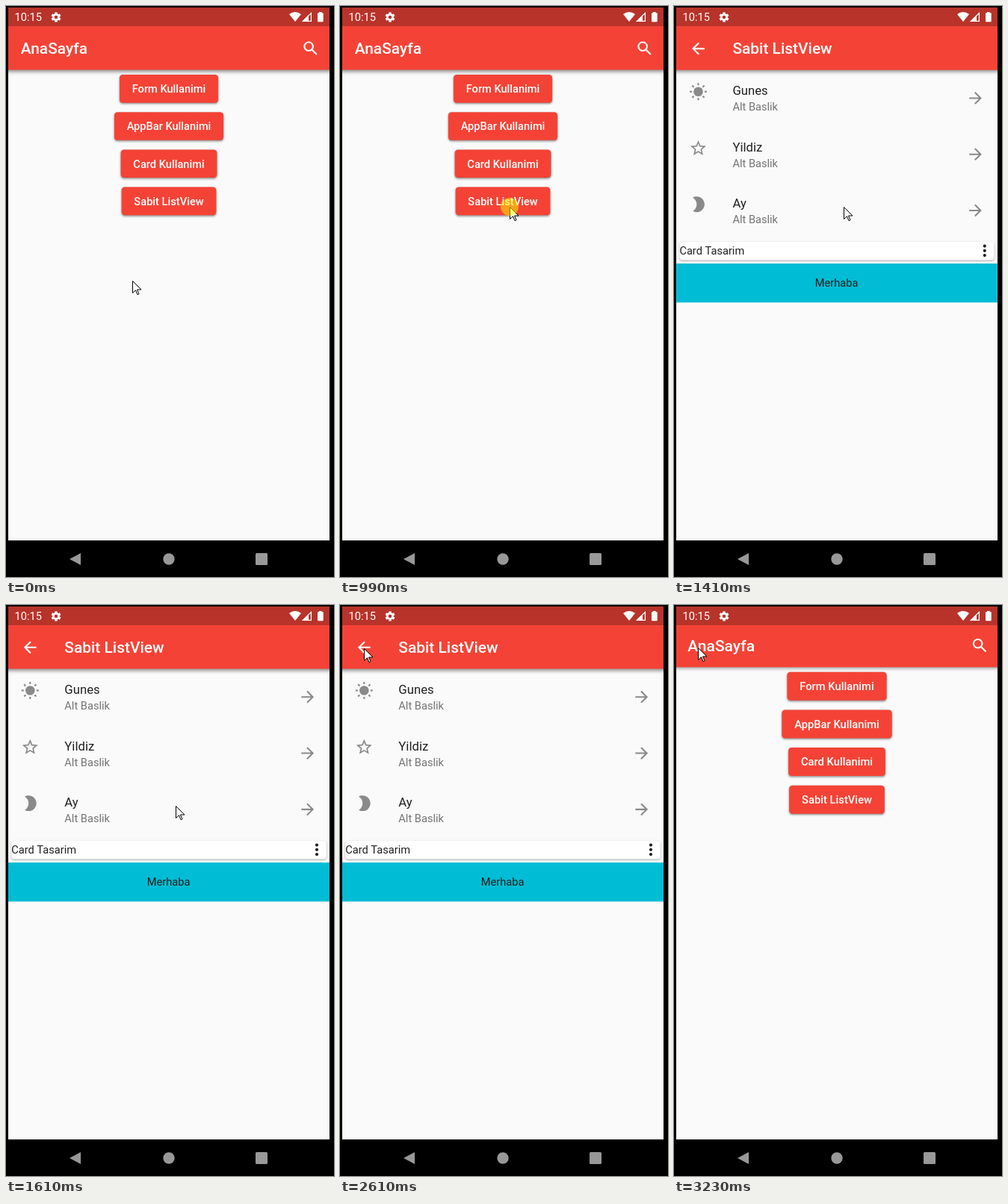
An HTML page with a canvas for the animation above (3.43 s loop, 439 by 765 pixels).

```html
<!DOCTYPE html>
<html lang="tr">
<head>
<meta charset="utf-8">
<title>Sabit ListView</title>
<style>
html, body { margin: 0; width: 100%; height: 100%; overflow: hidden; background: #000; }
canvas { display: block; width: 439px; height: 765px; }
</style>
</head>
<body>
<canvas id="stage"></canvas>
<script>
const W = 439, H = 765, LOOP = 3430;
const DP = 430 / 411;
const SCREEN = { x: 3, y: 2, w: 430, h: 714 };
const MID = { x: 218, y: 359 };
const RED = '#f44336', PAPER = '#fafafa', GREY = '#8a8a8a', INK = '#212121';

const canvas = document.getElementById('stage');
const ctx = canvas.getContext('2d');
const dpr = window.devicePixelRatio || 1;
canvas.width = W * dpr;
canvas.height = H * dpr;

// Each step: start time, cursor tip, page, and optional state
const steps = [
  { at: 0, x: 169, y: 368, page: home },
  { at: 200, x: 198, y: 337, page: home },
  { at: 390, x: 225, y: 281, page: home },
  { at: 590, x: 227, y: 269, page: home },
  { at: 990, x: 227, y: 269, page: home, click: true },
  { at: 1190, x: 227, y: 269, page: home, pressed: true },
  { at: 1410, x: 227, y: 269, page: list, zoom: 0.999 },
  { at: 1610, x: 227, y: 269, page: list },
  { at: 1810, x: 218, y: 252, page: list },
  { at: 2010, x: 116, y: 144, page: list },
  { at: 2210, x: 33, y: 63, page: list },
  { at: 2610, x: 32, y: 58, page: list },
  { at: 2810, x: 32, y: 57, page: list },
  { at: 3010, x: 32, y: 57, page: list, click: true },
  { at: 3230, x: 32, y: 57, page: home, zoom: 1.008 }
];

const BACK = new Path2D('M20 11H7.83l5.59-5.59L12 4l-8 8 8 8 1.41-1.41L7.83 13H20v-2z');
const FORWARD = new Path2D('M12 4l-1.41 1.41L16.17 11H4v2h12.17l-5.58 5.59L12 20l8-8z');
const MOON = new Path2D('M10 2c-1.82 0-3.53.5-5 1.35C7.99 5.08 10 8.3 10 12s-2.01 6.92-5 8.65C6.47 21.5 8.18 22 10 22c5.52 0 10-4.48 10-10S15.52 2 10 2z');
const STAR = new Path2D('M22 9.24l-7.19-.62L12 2 9.19 8.63 2 9.24l5.46 4.73L5.82 21 12 17.27 18.18 21l-1.63-7.03L22 9.24zM12 15.4l-3.76 2.27 1-4.28-3.32-2.88 4.38-.38L12 6.1l1.71 4.04 4.38.38-3.32 2.88 1 4.28L12 15.4z');
const ARROW = new Path2D('M.5.5v16l4-3.8 2.5 6 2-.9-2.5-5.8h5.5z');

function rect(x, y, w, h, color) {
  ctx.fillStyle = color;
  ctx.fillRect(x, y, w, h);
}

function disc(x, y, r, color) {
  ctx.fillStyle = color;
  ctx.beginPath();
  ctx.arc(x, y, r, 0, 2 * Math.PI);
  ctx.fill();
}

function poly(color, ...pts) {
  ctx.fillStyle = color;
  ctx.beginPath();
  pts.forEach(([x, y]) => ctx.lineTo(x, y));
  ctx.fill();
}

function rounded(x, y, w, h, r) {
  ctx.beginPath();
  ctx.roundRect(x, y, w, h, r);
}

function text(str, x, y, size, color, weight = 400, align = 'left') {
  ctx.font = `${weight} ${size * DP}px Roboto, sans-serif`;
  ctx.textAlign = align;
  ctx.fillStyle = color;
  ctx.fillText(str, x, y);
}

function shadow(dy, blur, alpha) {
  ctx.shadowColor = `rgba(0,0,0,${alpha})`;
  ctx.shadowOffsetY = dy * dpr;
  ctx.shadowBlur = blur * dpr;
}

// Runs a drawing in a 24-unit icon box centred on x, y
function icon(x, y, color, draw) {
  ctx.save();
  ctx.translate(x, y);
  ctx.scale(DP, DP);
  ctx.translate(-12, -12);
  ctx.fillStyle = ctx.strokeStyle = color;
  draw();
  ctx.restore();
}

const glyph = path => () => ctx.fill(path, 'evenodd');

function sun() {
  disc(12, 11.5, 6, GREY);
  ctx.translate(12, 11.5);
  for (let i = 0; i < 8; i++) {
    ctx.fillRect(8.1, -1, 2.9, 2);
    ctx.rotate(Math.PI / 4);
  }
}

function magnifier() {
  ctx.lineWidth = 2;
  ctx.beginPath();
  ctx.arc(9.5, 9.5, 5.5, 0, 2 * Math.PI);
  ctx.moveTo(13.6, 13.6);
  ctx.lineTo(19.75, 19.75);
  ctx.stroke();
}

function gear(x, y) {
  ctx.save();
  ctx.translate(x, y);
  ctx.strokeStyle = ctx.fillStyle = '#fff';
  ctx.lineWidth = 2.6;
  ctx.beginPath();
  ctx.arc(0, 0, 3.6, 0, 2 * Math.PI);
  ctx.stroke();
  for (let i = 0; i < 6; i++) {
    ctx.fillRect(-1.7, 4, 3.4, 2.5);
    ctx.rotate(Math.PI / 3);
  }
  ctx.restore();
}

function statusBar() {
  rect(3, 2, 430, 25, '#b8332a');
  text('10:15', 11.5, 20.3, 14, '#fff');
  gear(67, 15);

  ctx.fillStyle = '#fff';
  ctx.beginPath();
  ctx.moveTo(387, 21);
  ctx.lineTo(379, 11);
  ctx.quadraticCurveTo(387, 5, 395, 11);
  ctx.fill();

  poly('#fff', [396, 21], [405, 12], [405, 21]);
  ctx.strokeStyle = '#fff';
  ctx.lineWidth = 1.2;
  ctx.beginPath();
  ctx.moveTo(397.5, 20.4);
  ctx.lineTo(408.4, 9.5);
  ctx.lineTo(408.4, 20.4);
  ctx.closePath();
  ctx.stroke();

  rect(419, 8, 3.6, 2, '#fff');
  rounded(417, 9.2, 7.7, 12, 1);
  ctx.fill();
}

function navBar() {
  const color = '#989898';
  poly(color, [85, 741], [100, 733], [100, 749]);
  disc(218, 741, 7.7, color);
  rounded(334, 733, 16, 16, 1.5);
  ctx.fill();
}

function appBar(title, x) {
  ctx.save();
  shadow(2, 5, 0.45);
  rect(-6, -8, 448, 93.5, RED);
  ctx.restore();
  text(title, x, 64.2, 20, '#fff', 500);
}

function button(label, row, pressed, tip) {
  const y = 92 + row * 50.2, h = 36 * DP;
  ctx.font = `500 ${14 * DP}px Roboto, sans-serif`;
  const w = ctx.measureText(label).width + 32 * DP;
  const x = MID.x - w / 2;
  ctx.save();
  if (pressed) shadow(3, 7, 0.5);
  else shadow(1.4, 3, 0.45);
  ctx.fillStyle = RED;
  rounded(x, y, w, h, 4 * DP);
  ctx.fill();
  ctx.restore();
  if (pressed) {
    ctx.save();
    ctx.clip();
    rect(x, y, w, h, 'rgba(255,255,255,.09)');
    disc(tip.x, tip.y, 23, 'rgba(255,255,255,.18)');
    ctx.restore();
  }
  text(label, MID.x, y + 24.1, 14, '#fff', 500, 'center');
}

function home(s) {
  rect(-6, -8, 448, 740, PAPER);
  ['Form Kullanimi', 'AppBar Kullanimi', 'Card Kullanimi', 'Sabit ListView']
    .forEach((label, i) => button(label, i, s.pressed && i === 3, s));
  appBar('AnaSayfa', 19.8);
  icon(407.8, 56.8, '#fff', magnifier);
}

function list() {
  rect(3, 2, 430, 714, PAPER);
  const tiles = [['Gunes', sun], ['Yildiz', glyph(STAR)], ['Ay', glyph(MOON)]];
  tiles.forEach(([title, draw], i) => {
    const y = i * 72 * DP;
    icon(32.3, 115 + y, GREY, draw);
    text(title, 78.3, 119.2 + y, 16, INK);
    text('Alt Baslik', 78.3, 140.2 + y, 14, '#757575');
    icon(403.7, 123.2 + y, GREY, glyph(FORWARD));
  });

  ctx.save();
  shadow(1, 2.5, 0.35);
  ctx.fillStyle = '#fff';
  rounded(7.2, 316, 421.6, 24.6, 4);
  ctx.fill();
  ctx.restore();
  text('Card Tasarim', 7.2, 333.2, 14, INK);
  for (let i = -1; i <= 1; i++) disc(416, 327.8 + i * 6.27, 2.1, INK);

  rect(3, 345, 430, 52.3, '#00bcd4');
  text('Merhaba', 217.6, 376.2, 14, INK, 400, 'center');
  appBar('Sabit ListView', 78.3);
  icon(32.3, 56.8, '#fff', glyph(BACK));
}

function cursor(x, y) {
  ctx.save();
  ctx.translate(x, y);
  ctx.fillStyle = '#fff';
  ctx.strokeStyle = '#000';
  ctx.lineWidth = 1;
  ctx.fill(ARROW);
  ctx.stroke(ARROW);
  ctx.restore();
}

function paint(s) {
  ctx.setTransform(dpr, 0, 0, dpr, 0, 0);
  rect(0, 0, W, H, '#000');

  ctx.save();
  ctx.beginPath();
  ctx.rect(SCREEN.x, SCREEN.y, SCREEN.w, SCREEN.h);
  ctx.clip();
  rect(SCREEN.x, SCREEN.y, SCREEN.w, SCREEN.h, PAPER);
  const zoom = s.zoom || 1;
  ctx.translate(MID.x, MID.y);
  ctx.scale(zoom, zoom);
  ctx.translate(-MID.x, -MID.y);
  s.page(s);
  ctx.restore();

  statusBar();
  navBar();
  cursor(s.x, s.y);
  if (s.click) disc(s.x, s.y, 12, 'rgba(255,255,0,.5)');
}

const start = performance.now();
function tick() {
  const t = (performance.now() - start) % LOOP;
  paint(steps.findLast(s => s.at <= t));
  requestAnimationFrame(tick);
}
tick();
</script>
</body>
</html>
```
